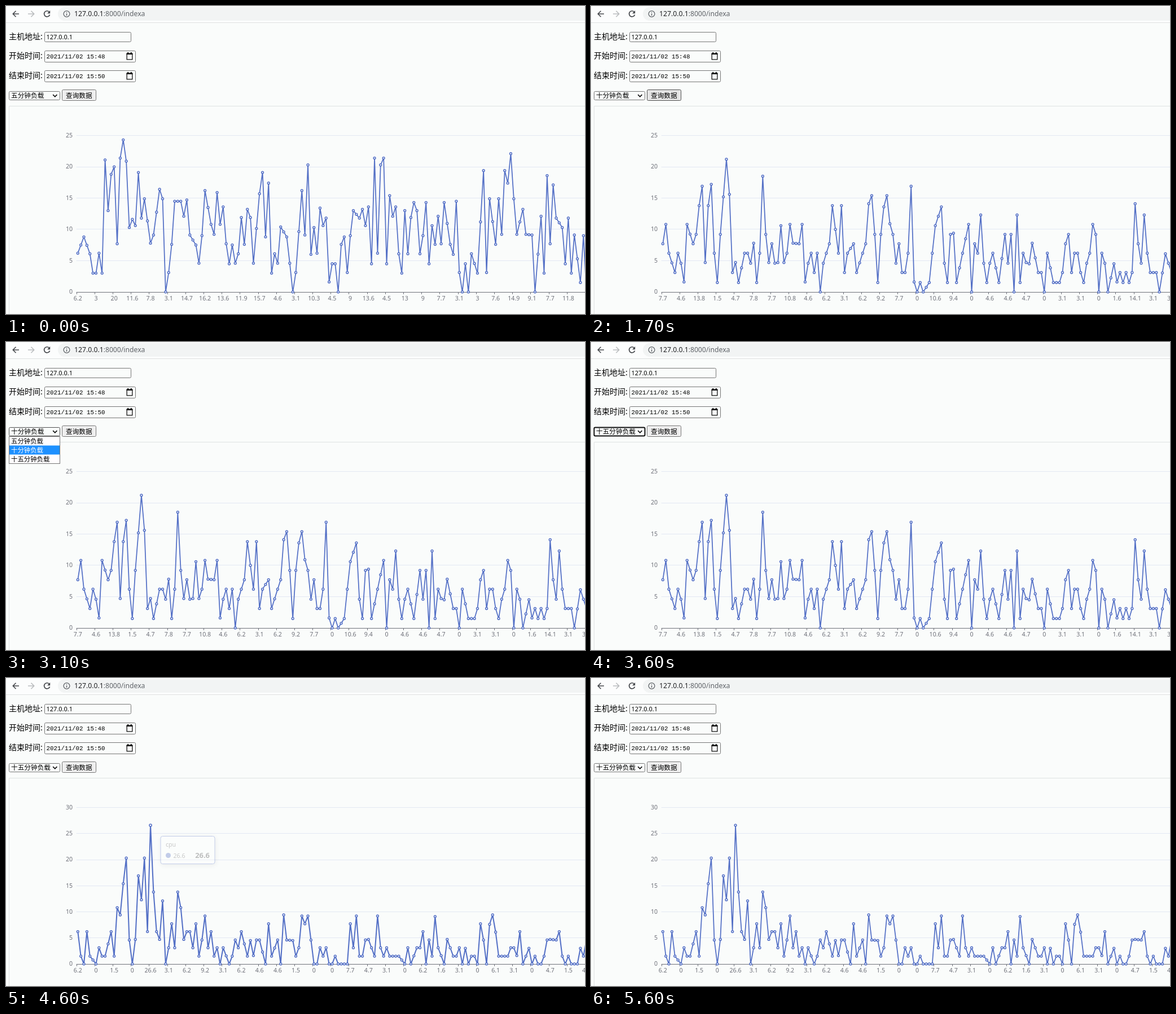
Write an HTML page that moves like this. It is 1026 px wide and 546 px high and loops after 6100 ms.

```html
<!DOCTYPE html>
<html lang="zh">
<head>
<meta charset="utf-8">
<style>
html, body { margin: 0; width: 100%; height: 100%; overflow: hidden; background: #fafcfb; }
svg { display: block; width: 1026px; height: 546px; }
text { font-family: "Noto Sans", "Noto Sans CJK SC", "Noto Sans CJK", sans-serif; white-space: pre; }
.cn { font-family: "Noto Sans CJK SC", "Noto Sans CJK", sans-serif; }
.mono { font-family: "Liberation Mono", monospace; }
</style>
</head>
<body>
<svg id="stage" viewBox="0 0 1026 546" xmlns="http://www.w3.org/2000/svg"></svg>
<script>
const LOOP = 6100, TICK = 100;
const BLUE = '#5470c6', HOT = '#5876d8', GREY = '#6e7079', BG = '#fafcfb';
const LEFT = 124.6, BAND = 5.365, BASE = 506.9, TOP = 229.6;
const NAMES = ['五分钟负载', '十分钟负载', '十五分钟负载'];

// Gaps lie on the straight line between their neighbours.
const load5 = [
  6.2,,8.8,,6.1,3,3,6.2,3,21.1,13,18.8,
  20,7.7,21.4,24.3,20.9,10.3,11.6,10.6,19.1,11.8,14.9,,
  7.8,9.1,,16.4,14.9,0,3.1,7.6,14.5,,14.5,12.1,
  14.7,9.1,,7.5,4.6,9,16.2,,10.8,9.2,15.9,10.8,
  13.6,7.7,4.5,7.5,4.6,6.1,11.9,7.6,13.2,11.9,4.6,,
  15.7,19.1,8.8,17.4,3,6.1,4.6,10.4,,8.8,4.6,0,
  3.1,,16.2,9.1,20.3,6,10.3,6.2,13.4,10.6,11.8,1.6,
  4.5,4.5,0,7.6,8.8,3.1,9,13,,11.8,13.2,10.6,
  13.6,4.5,21.4,6.2,20.3,21.4,4.5,15.4,12.1,13.6,6.1,3,
  13,6.1,11.9,14.3,13,6.1,9,14.3,4.5,10.6,7.6,12.1,
  7.7,14.3,,7.6,6,14.5,3.1,0,4.5,0,6.1,,
  3,,19.4,3.1,14.9,,7.6,14.9,9.2,19.4,17.4,22.1,
  14.9,9.2,,13.2,9.2,,9.1,0,,12.1,3,18.6,
  7.7,17.1,11.8,,10.3,4.5,11.8,3,9.1,,1.5,9,
  0
];
const load10 = [
  7.7,10.8,6.2,,3.1,6.2,4.6,1.6,10.8,,7.7,9.2,
  13.8,16.9,4.7,13.8,17.2,6.2,1.5,9.2,,21.2,15.6,3.1,
  4.7,1.5,,6.2,6.2,4.6,7.8,1.5,6.2,18.5,9.2,4.7,
  7.7,4.6,4.7,10.6,4.7,6.2,10.8,7.8,,7.7,10.8,1.6,
  4.6,6.2,3.1,6.2,0,4.6,6.2,7.7,13.8,,6.2,13.8,
  3.1,6.2,,7.7,3.1,,6.2,7.7,14.1,15.4,9.2,1.5,
  9.2,13.6,15.4,10.9,9.2,4.6,7.7,3.1,3.1,6.2,16.9,1.6,
  0,1.5,0,,1.5,6.2,10.6,,13.6,4.6,1.5,9.2,
  9.4,1.5,,6.2,,10.8,0,7.7,6.2,12.3,4.6,1.5,
  4.6,6.2,,1.5,,9.2,4.6,9.2,0,12.3,1.5,6.2,
  4.7,4.5,7.8,,3.1,3.1,0,6.2,,1.5,,1.5,
  3.1,7.7,9.2,3.1,6.2,6.2,3.1,1.5,4.6,6.2,10.8,9.2,
  0,6.2,4.6,0,,4.5,1.6,3.1,1.5,3.1,1.5,3.1,
  14.1,7.7,4.6,12.3,6.2,3.1,3.1,3.1,0,,6.1,,
  3.1
];
const load15 = [
  6.2,1.5,0,6.2,1.5,,0,3.1,1.5,1.5,,6.2,
  1.5,10.8,9.4,15.4,20.3,4.6,0,4.7,16.9,12.3,20.3,6.2,
  26.6,13.8,6.2,4.7,12.1,0,3.1,7.7,3.1,13.8,10.8,4.7,
  6.2,6.2,3.1,7.7,1.5,4.6,9.2,3.1,6.2,1.5,3.1,0,
  3.1,,0,1.5,4.6,3.1,6.2,,1.5,4.5,1.6,4.6,
  4.6,,0,7.7,1.5,,4.6,0,9.4,4.6,,4.5,
  1.5,3.1,9.2,7.7,9.2,4.6,0,0,3.1,1.5,3.1,0,
  0,1.5,0,,,0,7.7,3.1,9.2,1.5,1.5,4.6,
  4.7,,1.5,9.2,3.1,1.5,3.1,1.5,,,1.5,,
  0,3.1,0,,3.1,3.1,6.2,0,4.6,1.5,9.1,3.1,
  1.6,0,4.7,,1.5,1.5,3.1,0,3,0,1.5,1.5,
  0,7.7,4.6,0,7.6,9.4,6.1,1.5,,,1.5,3.1,
  3.1,1.6,6.2,0,,3,0,1.5,0,0,1.5,4.6,
  4.7,,4.6,6.2,1.5,0,1.5,0,,0,3,1.5,
  4.6
];

const stage = document.getElementById('stage');

function el(parent, tag, attrs) {
  const node = document.createElementNS(stage.namespaceURI, tag);
  set(node, attrs);
  return parent.appendChild(node);
}
function set(node, attrs) {
  for (const k in attrs) node.setAttribute(k, attrs[k]);
}
function label(parent, x, y, size, str, fill = '#000', more = {}) {
  const node = el(parent, 'text', { x, y, 'font-size': size, fill, ...more });
  node.textContent = str;
  return node;
}
function box(parent, x, y, w, h, fill, stroke, rx = 2) {
  return el(parent, 'rect', { x: x + .5, y: y + .5, width: w - 1, height: h - 1, rx, fill, stroke });
}
function stroke(parent, d, color, width = 1) {
  return el(parent, 'path', { d, fill: 'none', stroke: color, 'stroke-width': width });
}
function show(node, on) {
  node.style.display = on ? '' : 'none';
}
const CN = { class: 'cn' };

function fillGaps(list) {
  const out = [];
  for (let i = 0; i < list.length; i++) {
    let a = i, b = i;
    while (!(a in list)) a--;
    while (!(b in list)) b++;
    out.push(a === b ? list[i] : list[a] + (list[b] - list[a]) * (i - a) / (b - a));
  }
  return out;
}

function drawToolbar() {
  el(stage, 'rect', { width: 1026, height: 29, fill: '#fcfdfd' });
  el(stage, 'rect', { x: 92, y: 2, width: 960, height: 24, rx: 12, fill: '#f2f4f4' });
  el(stage, 'rect', { y: 29, width: 1026, height: 1, fill: '#dfe1e1' });
  stroke(stage, 'M23 14H12.5M17.5 8.8L12.3 14L17.5 19.2', '#45484c', 1.6);
  stroke(stage, 'M39 14H49.5M44.5 8.8L49.7 14L44.5 19.2', '#b9bcbe', 1.6);
  stroke(stage, 'M76.4 10.3A5.1 5.1 0 1 0 77.6 15.4', '#45484c', 1.7);
  el(stage, 'path', { d: 'M78.2 8V13.2H73Z', fill: '#45484c' });
  el(stage, 'circle', { cx: 107.5, cy: 14, r: 5.4, fill: 'none', stroke: '#5f6368', 'stroke-width': 1.3 });
  stroke(stage, 'M107.5 13.2V17M107.5 10.7V12.1', '#5f6368', 1.4);
  const url = label(stage, 121, 18.3, 12.2, '127.0.0.1', '#202124');
  const rest = el(url, 'tspan', { fill: '#5f6368' });
  rest.textContent = ':8000/indexa';
}

function drawForm() {
  label(stage, 5, 59.3, 14, '主机地址:', '#000', CN);
  box(stage, 68, 46, 154, 18, BG, '#767676');
  label(stage, 71.5, 59, 11, '127.0.0.1');
  [['开始时间:', '48', 79], ['结束时间:', '50', 114]].forEach(([name, minute, y]) => {
    label(stage, 5, y + 14, 14, name, '#000', CN);
    box(stage, 68, y, 162, 21, BG, '#767676');
    label(stage, 71.5, y + 14, 10.83, '2021/11/02 15:' + minute, '#000', { class: 'mono' });
    stroke(stage, `M214.2 ${y + 5.2}h9.6v10.6h-9.6z`, '#111', 1.3);
    stroke(stage, `M213.6 ${y + 6}h10.8M216.2 ${y + 3}v2.5M221.8 ${y + 3}v2.5`, '#111', 2);
  });
}

function drawChart(list, max) {
  const g = el(stage, 'g', {});
  const y = v => BASE - v * (BASE - TOP) / max;
  const x = i => LEFT + BAND * (i + .5);
  for (let v = 0; v <= max; v += 5) {
    if (v) stroke(g, `M${LEFT} ${Math.floor(y(v)) + .5}H1026`, '#e3e8f3');
    label(g, 118, y(v) + 3.4, 10.6, v, GREY, { 'text-anchor': 'end' });
  }
  let ticks = `M${LEFT} 507.5H1026`;
  const data = fillGaps(list);
  data.forEach((v, i) => {
    if (i % 6) return;
    ticks += `M${Math.round(LEFT + BAND * i) + .5} 507v4`;
    label(g, x(i), 522, 10.6, v, GREY, { 'text-anchor': 'middle' });
  });
  stroke(g, ticks, GREY);
  const line = stroke(g, 'M' + data.map((v, i) => x(i).toFixed(2) + ' ' + y(v).toFixed(2)).join('L'), BLUE, 1.75);
  line.setAttribute('stroke-linejoin', 'bevel');
  const dots = el(g, 'g', { fill: '#fff', stroke: BLUE, 'stroke-width': 1.5 });
  data.forEach((v, i) => el(dots, 'circle', { cx: x(i), cy: y(v), r: 1.9 }));
  return { g, line, dots };
}

function drawTip() {
  const g = el(stage, 'g', {});
  g.style.filter = 'drop-shadow(1px 2px 4px rgba(0,0,0,.18))';
  box(g, 273.5, 280, 97, 50, '#fff', BLUE, 3.5);
  label(g, 283, 299, 10.6, 'cpu', '#666');
  el(g, 'circle', { cx: 287.5, cy: 314.5, r: 4.5, fill: BLUE });
  label(g, 296.5, 318.5, 10.6, '26.6', '#666');
  label(g, 361, 318.8, 12.9, '26.6', '#464646', { 'font-weight': 700, 'text-anchor': 'end' });
  return g;
}

function drawPopup() {
  const g = el(stage, 'g', {});
  box(g, 5, 167, 91, 49, '#fffdff', '#767676', 0);
  const bar = el(g, 'rect', { x: 6, width: 89, height: 16, fill: '#1e90ff' });
  const rows = NAMES.map((name, i) => label(g, 9, 180 + 16 * i, 11.4, name, '#000', CN));
  return { g, bar, rows };
}

drawToolbar();
drawForm();
stroke(stage, 'M1026 177.5H5.5V546', '#dfe2e2');
const charts = [drawChart(load5, 25), drawChart(load10, 25), drawChart(load15, 30)];
const tip = drawTip();
const select = box(stage, 5, 151, 91, 16, BG, '#767676');
const choice = label(stage, 9, 163, 11.67, '', '#000', CN);
stroke(stage, 'M83.2 157.2L86.8 160.8L90.4 157.2', '#111', 1.7);
const button = box(stage, 99, 148, 61, 20, '#efefef', '#767676');
label(stage, 106, 163, 11.67, '查询数据', '#000', CN);
const popup = drawPopup();

function render(ms) {
  const t = Math.floor(ms / TICK) * TICK;
  const within = (a, b) => t >= a && t < b;
  const ramp = (a, d) => Math.min(1, Math.max(0, (t - a) / d));

  // form controls
  choice.textContent = NAMES[t < 1300 ? 0 : t < 3600 ? 1 : 2];
  const focus = within(1300, 1600) || within(2500, 2900) || within(3600, 3900);
  const hover = within(300, 500) || within(600, 1300) || within(2000, 2500) || within(2900, 3600);
  set(select, {
    stroke: focus ? '#101010' : hover ? '#4f4f4f' : '#767676',
    'stroke-width': focus ? 2 : 1
  });
  const over = within(1400, 1800) || within(3700, 4100);
  set(button, { fill: over ? '#e5e5e5' : '#efefef', stroke: over ? '#4f4f4f' : '#767676' });

  // option list
  show(popup.g, within(800, 1300) || within(2100, 2500) || within(3000, 3600));
  const active = t < 1100 ? 0 : t < 3300 ? 1 : 2;
  popup.bar.setAttribute('y', 167.5 + 16 * active);
  popup.rows.forEach((row, i) => row.setAttribute('fill', i === active ? '#fff' : '#000'));

  // chart and tooltip
  const current = t < 1700 ? 0 : t < 4000 ? 1 : 2;
  charts.forEach((c, i) => show(c.g, i === current));
  const glow = ramp(4500, 300) * (1 - ramp(5200, 400));
  const color = glow > .5 ? HOT : BLUE;
  const { line, dots } = charts[2];
  set(line, { 'stroke-width': 1.75 + .9 * glow, stroke: color });
  dots.setAttribute('stroke', color);
  dots.children[24].setAttribute('r', 1.9 + .7 * glow);
  show(tip, glow > 0);
  tip.style.opacity = glow;
}

const start = performance.now();
function loop() {
  render((performance.now() - start) % LOOP);
  requestAnimationFrame(loop);
}
loop();
</script>
</body>
</html>
```
